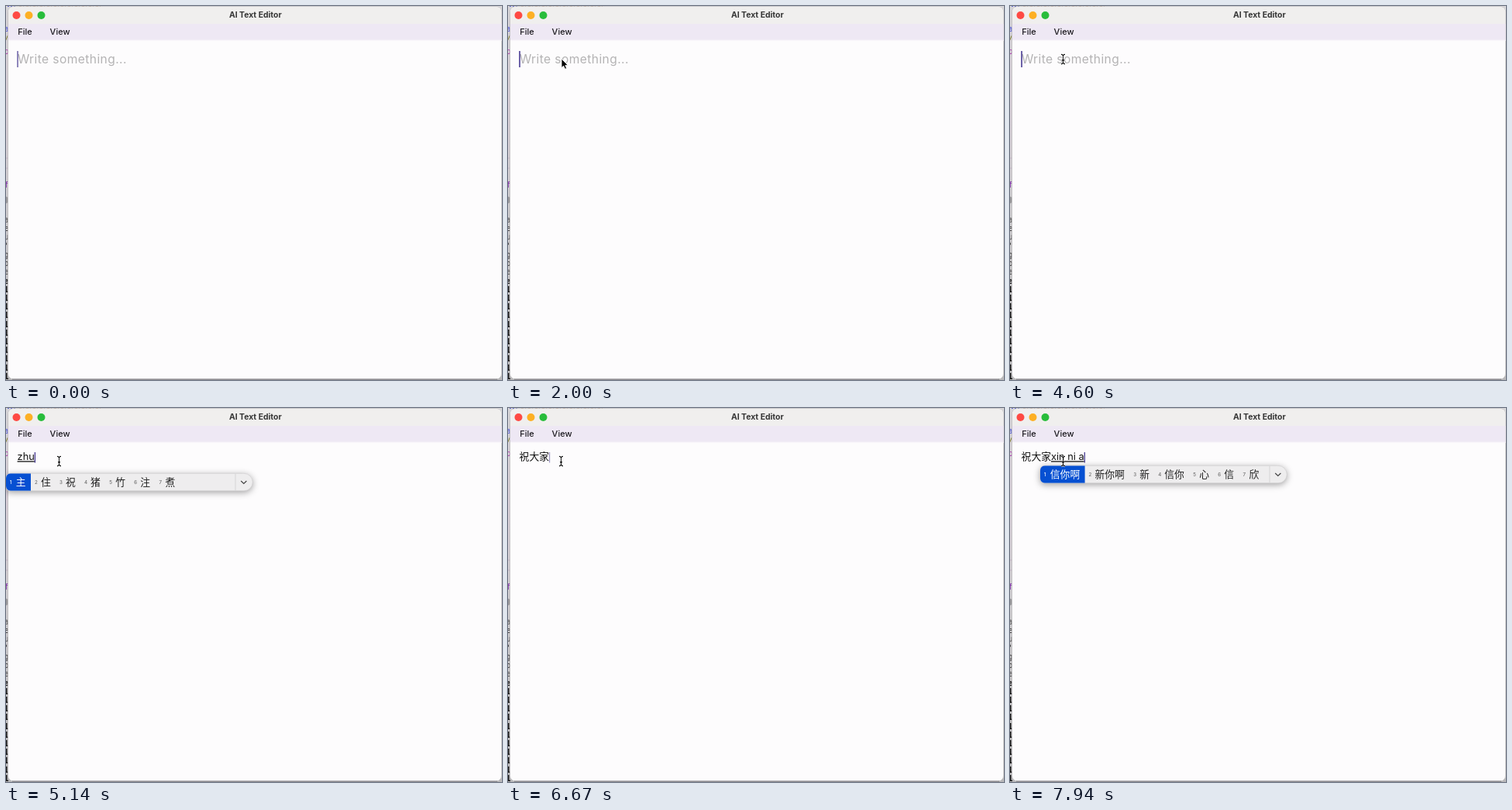
Write an HTML page that moves like this. It is 640 px wide and 482 px high and loops after 8000 ms.

```html
<!DOCTYPE html>
<html lang="zh-CN">
<head>
<meta charset="utf-8">
<title>AI Text Editor</title>
<style>
  html, body { margin: 0; width: 100%; height: 100%; overflow: hidden; background: #fdfcfd; }
  svg { display: block; width: 640px; height: 482px; font-family: Inter, "Noto Sans CJK SC", "Noto Sans CJK", sans-serif; }
  text { white-space: pre; }
  .title { font-size: 10.4px; font-weight: 700; fill: #363636; text-anchor: middle; }
  .menu { font-size: 11px; font-weight: 500; fill: #1d1b20; letter-spacing: .05px; }
  .hint { font-size: 15.6px; letter-spacing: .4px; fill: #b4b3b4; }
  .typed { font-size: 12.8px; fill: #111; }
  .composing { text-decoration: underline; text-decoration-thickness: 1px; text-decoration-skip-ink: none; text-underline-offset: 1.5px; }
  .code { font: 10px "DejaVu Sans Mono", monospace; text-anchor: end; }
  .bar { filter: drop-shadow(0 2px 4px rgba(0, 0, 0, .36)); }
  .word { font-size: 12.8px; fill: #222; }
  .digit { font-size: 6.2px; font-weight: 500; fill: #6c6c6c; }
  .picked .word, .picked .digit { fill: #fff; }
  .picked .word { font-weight: 500; }
</style>
</head>
<body>
<svg viewBox="0 0 640 482">
  <defs>
    <linearGradient id="backdrop" x2="0" y2="1">
      <stop offset="0" stop-color="#d6d5d8"/>
      <stop offset=".25" stop-color="#d8ced8"/>
      <stop offset=".5" stop-color="#cfcdd0"/>
      <stop offset="1" stop-color="#b8b7b9"/>
    </linearGradient>
    <linearGradient id="menuEdge" x2="0" y2="1">
      <stop offset="0" stop-color="#eee8f4"/>
      <stop offset="1" stop-color="#fdfcfd"/>
    </linearGradient>
    <clipPath id="pill"><rect width="318.5" height="22.5" rx="6"/></clipPath>
  </defs>

  <rect width="640" height="482" fill="url(#backdrop)"/>
  <g id="behind"></g>

  <rect x="2.5" y=".8" width="637" height="480.2" rx="7" fill="#fdfcfd" stroke="#b3b2b4" stroke-width=".7"/>
  <path d="M3 23V8Q3 1 10 1H632Q639.3 1 639.3 8V23Z" fill="#f0efee"/>
  <rect x="3" y="23" width="636.5" height="20" fill="#eee8f4"/>
  <rect x="3" y="43" width="636.5" height="2" fill="url(#menuEdge)"/>
  <path d="M8 481.2H634" stroke="#858487" stroke-width="1.2"/>
  <circle cx="13.5" cy="12" r="5" fill="#fe4a44"/>
  <circle cx="29.5" cy="12" r="5" fill="#fdb024"/>
  <circle cx="45.5" cy="12" r="5" fill="#28bd3b"/>
  <text class="title" x="321.8" y="15.4">AI Text Editor</text>
  <text class="menu" x="15.2" y="37.4">File</text>
  <text class="menu" x="56.6" y="37.4">View</text>

  <text class="hint" id="hint" x="14.9" y="73.5">Write something...</text>
  <text class="typed" id="line" x="14.6" y="67.3"><tspan id="done"></tspan><tspan id="composing" class="composing"></tspan></text>
  <rect id="caret" fill="#3d2f8c"/>
  <g id="bar" class="bar"></g>

  <path id="arrow" d="M0 0V11.6L2.7 9.2L4.6 13.3L6.7 12.4L4.9 8.4H8.4Z" fill="#000" stroke="#fff" stroke-width=".9" stroke-linejoin="round"/>
  <g id="beam" fill="none">
    <path id="beamShape" d="M66 62.3Q68.5 62.3 68.5 64.3Q68.5 62.3 71 62.3M68.5 64V73M66 74.8Q68.5 74.8 68.5 72.8Q68.5 74.8 71 74.8M67 69.8H70" stroke="#fff" stroke-width="2.2" opacity=".8"/>
    <use href="#beamLine"/>
    <path id="beamLine" d="M66 62.3Q68.5 62.3 68.5 64.3Q68.5 62.3 71 62.3M68.5 64V73M66 74.8Q68.5 74.8 68.5 72.8Q68.5 74.8 71 74.8M67 69.8H70" stroke="#111" stroke-width="1"/>
  </g>
</svg>
<script>
const LOOP = 8000;
const $ = id => document.getElementById(id);

// [time, committed text, text being composed, candidates]
const typing = [
  [0, '', '', ''],
  [4670, '', 'z', '在 再 自 做 最 只 早'],
  [4870, '', 'zh', '这 中 着 只 真 找 张'],
  [5000, '', 'zhu', '主 住 祝 猪 竹 注 煮'],
  [5270, '', 'zhu d', '主打 祝大家 主的 住的 主动 住'],
  [5400, '', 'zhu da', '祝大 祝大家 主打 朱耷 主答 住'],
  [6070, '', 'zhu da j', '祝大家 祝大 主打 住 主 祝'],
  [6200, '', 'zhu da ji', '祝大家 祝大 主打 住 主 祝'],
  [6330, '', 'zhu da jia', '祝大家 祝大 主打 住 主 祝'],
  [6470, '祝大家', '', ''],
  [7270, '祝大家', 'x', '想 下 小 写 新 向 像'],
  [7400, '祝大家', 'xi', '系 西 洗 喜 细 希 习'],
  [7530, '祝大家', 'xin', '新 心 信 欣 辛 薪 芯'],
  [7670, '祝大家', 'xin n', '新年 信念 新 心 信 欣'],
  [7800, '祝大家', 'xin ni', '信你 新年 新 心 信 欣'],
  [7940, '祝大家', 'xin ni a', '信你啊 新你啊 新 信你 心 信 欣']
];

// [time, x, y] of the arrow tip
const path = [
  [70, 650, 394], [270, 520, 310], [470, 320, 190], [670, 165, 108],
  [870, 108, 84], [940, 106, 83], [1070, 71, 76], [1270, 69, 68]
];
const BEAM_AT = 3130;

// [middle, half length] of each time the caret fades away
const dips = [[-90, 30], [820, 50], [1840, 60], [2820, 40], [3930, 150], [5600, 50], [6750, 40]];

function drawBackdrop() {
  const rows = [
    [33, 'a', '#2a35d8'], [46, '/', '#76761c'], [62, 'p', '#a62ba8'], [234, 'f', '#7d27a8'],
    ...[...'aeu\'goe'].map((ch, i) => [279 + i * 11.2, ch, '#333']),
    ...[...'e11111111111'].map((ch, i) => [357.5 + i * 11.2, ch, '#111', 700])
  ];
  const glyphs = rows.map(([y, ch, fill, weight = 400]) =>
    `<text class="code" x="3.6" y="${y}" fill="${fill}" style="font-weight:${weight}">${ch}</text>`);
  $('behind').innerHTML = glyphs.join('') +
    '<circle cx="-1" cy="250" r="4.5" fill="#98979a"/>' +
    '<path d="M0 196H3M0 209H3" stroke="#c3b3c5"/>' +
    '<path d="M2 .3H14" stroke="#4650c8" stroke-dasharray="2 2"/>' +
    '<path d="M17 .3H124" stroke="#a98262" stroke-width=".8" stroke-dasharray="3 2 1 3"/>';
}

function drawBar(words, x, y) {
  if (!words) return void ($('bar').innerHTML = '');
  let left = 4.8, items = '';
  words.split(' ').forEach((word, i) => {
    const end = left + 8 + word.length * 12.8;
    items += `<g class="${i ? '' : 'picked'}">` +
      (i ? '' : `<rect width="${end + 6.4}" height="22.5" fill="#0650d2" clip-path="url(#pill)"/>`) +
      `<text class="digit" x="${left}" y="13.4">${i + 1}</text>` +
      `<text class="word" x="${left + 8}" y="15.9">${word}</text></g>`;
    left = end + 11.3;
  });
  $('bar').innerHTML = `<g transform="translate(${x} ${y})">
    <path d="M6 0H307A11.25 11.25 0 0 1 307 22.5H6Q0 22.5 0 16.5V6Q0 0 6 0Z" fill="#eeedee" stroke="#c4c3c5" stroke-width=".5"/>
    ${items}
    <path d="M296 0V22.5" stroke="#d5d4d6"/>
    <path d="M303.2 9.7L306.8 13.1L310.4 9.7" fill="none" stroke="#444" stroke-width="1.2"/></g>`;
}

function drawText([, done, composing, words]) {
  const empty = !done && !composing;
  $('hint').style.display = empty ? '' : 'none';
  $('done').textContent = done;
  $('composing').textContent = composing;
  const caret = $('caret');
  caret.setAttribute('x', empty ? 14.3 : 14.6 + $('line').getComputedTextLength());
  caret.setAttribute('y', empty ? 58 : 57);
  caret.setAttribute('height', empty ? 21 : 13.5);
  caret.setAttribute('width', empty ? 1.5 : 1.2);
  done ? drawBar(words, 39, 74.3) : drawBar(words, 0, 84.3);
}

function pointerAt(t) {
  const next = path.findIndex(p => p[0] > t);
  if (next < 0) return path[path.length - 1].slice(1);
  if (next === 0) return path[0].slice(1);
  const [t0, x0, y0] = path[next - 1], [t1, x1, y1] = path[next];
  const k = (t - t0) / (t1 - t0);
  return [x0 + (x1 - x0) * k, y0 + (y1 - y0) * k];
}

function caretOpacity(t) {
  const levels = dips.map(([mid, half]) => (Math.abs(t - mid) - half) / 80);
  return Math.max(0, Math.min(1, ...levels));
}

let shown;
function render(t) {
  const state = typing.filter(s => s[0] <= t).pop();
  if (state !== shown) drawText(shown = state);
  $('caret').style.opacity = caretOpacity(t);
  const [x, y] = pointerAt(t);
  $('arrow').setAttribute('transform', `translate(${x} ${y})`);
  $('arrow').style.display = t < BEAM_AT ? '' : 'none';
  $('beam').style.display = t < BEAM_AT ? 'none' : '';
}

drawBackdrop();
const start = performance.now();
function tick() {
  render((performance.now() - start) % LOOP);
  requestAnimationFrame(tick);
}
tick();
</script>
</body>
</html>
```
